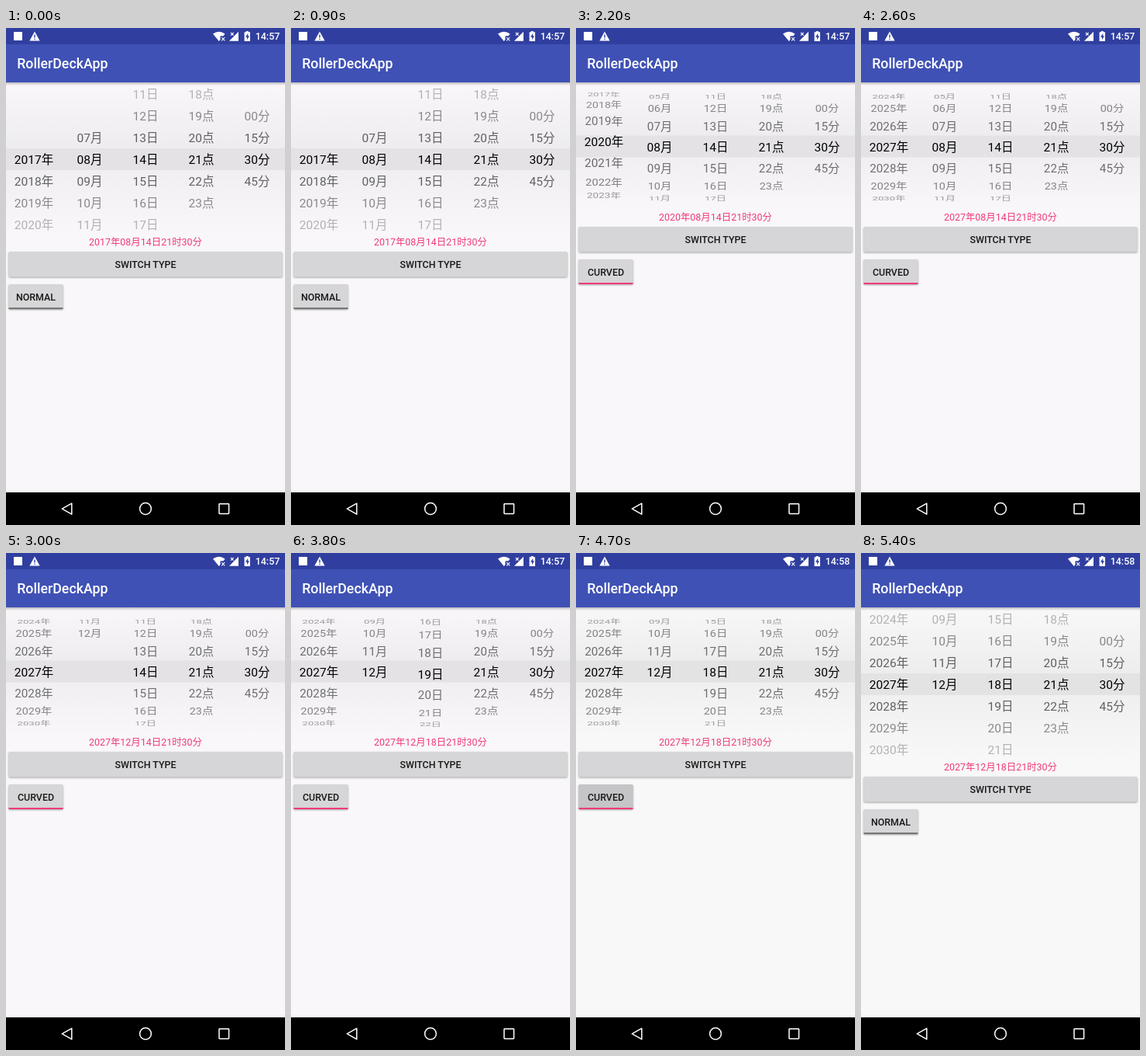
Recreate the animation shown at these times as an HTML page. Size 360 px wide and 640 px high, loop 5600 ms.

```html
<!DOCTYPE html>
<html lang="zh-CN">
<head>
<meta charset="utf-8">
<title>RollerDeckApp</title>
<style>
html, body { margin: 0; width: 100%; height: 100%; overflow: hidden; background: #000; }
svg { display: block; width: 360px; height: 640px; }
text { font-family: Roboto, "Noto Sans CJK SC", "Noto Sans CJK", sans-serif; font-size: 12.44px; }
.mid { text-anchor: middle; }
.med { font-weight: 500; }
.row { font-size: 15.55px; }
.btn { fill: #d6d5d7; filter: drop-shadow(0 1px 1px rgba(0,0,0,.35)); }
.line { fill: none; stroke: #fff; stroke-width: 1.5; }
</style>
</head>
<body>
<svg viewBox="0 0 360 640" xmlns="http://www.w3.org/2000/svg">
  <defs>
    <linearGradient id="above" x2="0" y2="1">
      <stop offset="0" stop-opacity="0"/><stop offset="1" stop-opacity=".045"/>
    </linearGradient>
    <linearGradient id="below" x2="0" y2="1">
      <stop offset="0" stop-opacity=".035"/><stop offset="1" stop-opacity="0"/>
    </linearGradient>
    <linearGradient id="shade" x2="0" y2="1">
      <stop offset="0" stop-opacity=".25"/><stop offset="1" stop-opacity="0"/>
    </linearGradient>
  </defs>
  <rect id="page" width="360" height="598"/>
  <rect id="top" y="70" width="360" fill="url(#above)"/>
  <rect id="band" width="360" height="28" fill-opacity=".085"/>
  <rect id="bottom" width="360" fill="url(#below)"/>
  <g id="wheels"></g>

  <g id="panel">
    <text id="label" class="mid" x="180" y="279.5" fill="#f03a7a"></text>
    <rect class="btn" x="3.5" y="288" width="353" height="32.5" rx="1.5"/>
    <text class="mid med" x="180" y="308.5" fill="#191919">SWITCH TYPE</text>
    <rect class="btn" x="3.5" y="330" width="70" height="32" rx="1.5"/>
    <rect id="press" x="3.5" y="330" width="70" height="32" rx="1.5"/>
    <rect id="mark" x="3.5" y="360" width="70" height="2"/>
    <text id="kind" class="mid med" x="38.5" y="350.5" fill="#191919"></text>
  </g>

  <rect y="70" width="360" height="4" fill="url(#shade)"/>
  <rect y="21" width="360" height="49" fill="#3f51b5"/>
  <rect width="360" height="21" fill="#303f9f"/>
  <text class="med" x="14.2" y="52.4" fill="#fff" style="font-size:17.78px">RollerDeckApp</text>

  <g fill="#fff">
    <rect x="10" y="5" width="11" height="11"/>
    <path d="M37 4.5 43.6 16.5H30.4Z"/>
    <path d="M267 7.5Q274.8 1.8 282.6 7.5L280.5 10.3H276.5V15L274.8 17Z"/>
    <path d="M300 4.8V16.8H288Z"/>
    <path d="M309.8 4H312.8V5.3H315V17H307.6V5.3H309.8Z"/>
    <text id="clock" class="med" x="353.3" y="15.4" text-anchor="end"></text>
  </g>
  <path d="M37 8.5V12.5M37 13.7V15.1" stroke="#303f9f" stroke-width="1.4"/>
  <path d="M312.2 6.8 309 11.7H311V15.2L314 10.2H312.2Z" fill="#303f9f"/>
  <path d="M278.2 12 282.3 16.4M282.3 12 278.2 16.4M290 6 293.6 9.6M293.6 6 290 9.6" class="line" style="stroke-width:1.1"/>

  <rect y="598" width="360" height="42"/>
  <g class="line">
    <path d="M84.8 612.2V626.2L72.3 619.2Z" stroke-linejoin="round"/>
    <circle cx="180" cy="619" r="7.4"/>
    <rect x="275" y="612.8" width="12.6" height="12.6" rx=".6"/>
  </g>
</svg>
<script>
const LOOP = 5600, STEP = 100;
const TO_CURVED = 1400, TO_FLAT = 4800, NEXT_MINUTE = 4500;
const R = 71, TURN = Math.PI / 8, GAP = 28;

// Wheel positions: [ms, value] pairs, linear in between
const yearTrack = [[1600, 2017], [2000, 2018.8], [2200, 2020.25], [2400, 2025], [2600, 2027]];
const monthTrack = [[2600, 8], [2800, 10], [3000, 14], [3200, 12]];
const dayTrack = [[3300, 14], [3500, 15.6], [3800, 18.9], [4000, 18]];

const $ = id => document.getElementById(id);
const set = (el, attrs) => { for (const k in attrs) el.setAttribute(k, attrs[k]); };
const pad = n => String(n).padStart(2, "0");
const clamp = (v, lo, hi) => Math.max(lo, Math.min(hi, v));

function follow(track, t) {
  let [t0, v0] = track[0];
  for (const [t1, v1] of track) {
    if (t < t1) return t <= t0 ? v0 : v0 + (v1 - v0) * (t - t0) / (t1 - t0);
    [t0, v0] = [t1, v1];
  }
  return v0;
}

const slots = [...Array(5)].map(() => [...Array(9)].map(() => {
  const el = document.createElementNS("http://www.w3.org/2000/svg", "text");
  el.setAttribute("class", "row mid");
  el.setAttribute("y", 5.5);
  return $("wheels").appendChild(el);
}));

function place(el, x, k, curved) {
  const d = Math.abs(k);
  let y = 169.6 + k * GAP, sx = 1, sy = 1;
  if (curved) {
    const c = Math.cos(k * TURN);
    y = 153.5 + R * Math.sin(k * TURN);
    sx = 1 - .24 * (1 - c);
    sy = Math.max(c, 0) ** .72;
  }
  const alpha = d < .5 ? 1 : curved ? .63 - .085 * d : .76 - .16 * d;
  set(el, { transform: `translate(${x} ${y}) scale(${sx} ${sy})`, "fill-opacity": alpha });
}

function drawWheel(i, wheel, curved) {
  const { pos, min, max, text } = wheel;
  const first = Math.round(pos) - 4;
  slots[i].forEach((el, j) => {
    const n = first + j, k = n - pos;
    const shown = n >= min && n <= max && Math.abs(k) < 3.5;
    el.textContent = shown ? text(n) : "";
    if (shown) place(el, 36 + 72 * i, k, curved);
  });
}

function draw(t) {
  const curved = t >= TO_CURVED && t < TO_FLAT;
  const year = follow(yearTrack, t), month = follow(monthTrack, t), day = follow(dayTrack, t);
  const y = Math.floor(year), m = clamp(Math.floor(month), 1, 12), d = Math.floor(day);

  [
    { pos: year, min: 2017, max: 2099, text: n => n + "年" },
    { pos: month, min: y > 2017 ? 1 : 7, max: 12, text: n => pad(n) + "月" },
    { pos: day, min: 1, max: 31, text: n => pad(n) + "日" },
    { pos: 21, min: 0, max: 23, text: n => pad(n) + "点" },
    { pos: 2, min: 0, max: 3, text: n => pad(n * 15) + "分" }
  ].forEach((w, i) => drawWheel(i, w, curved));

  const band = curved ? 138.5 : 155, end = curved ? 236 : 268;
  set($("top"), { height: band - 70 });
  set($("band"), { y: band });
  set($("bottom"), { y: band + 28, height: end - band - 28 });
  set($("panel"), { transform: `translate(0 ${curved ? -32 : 0})` });
  set($("mark"), { fill: curved ? "#f03a7a" : "#757575" });

  // Button press fades out after each switch
  const since = Math.min(...[TO_CURVED, TO_FLAT].map(s => t - s + STEP).filter(v => v >= 0), LOOP);
  set($("press"), { "fill-opacity": since < 300 ? [.08, .08, .03][Math.floor(since / STEP)] : 0 });

  const late = t >= NEXT_MINUTE;
  set($("page"), { fill: late ? "#f8f8f8" : "#f9f7fa" });
  $("kind").textContent = curved ? "CURVED" : "NORMAL";
  $("label").textContent = `${y}年${pad(m)}月${pad(d)}日21时30分`;
  $("clock").textContent = late ? "14:58" : "14:57";
}

const start = performance.now();
let last = -1;
function tick(now) {
  const t = Math.floor(Math.max(0, now - start) % LOOP / STEP) * STEP;
  if (t !== last) draw(last = t);
  requestAnimationFrame(tick);
}
draw(0);
requestAnimationFrame(tick);
</script>
</body>
</html>
```
